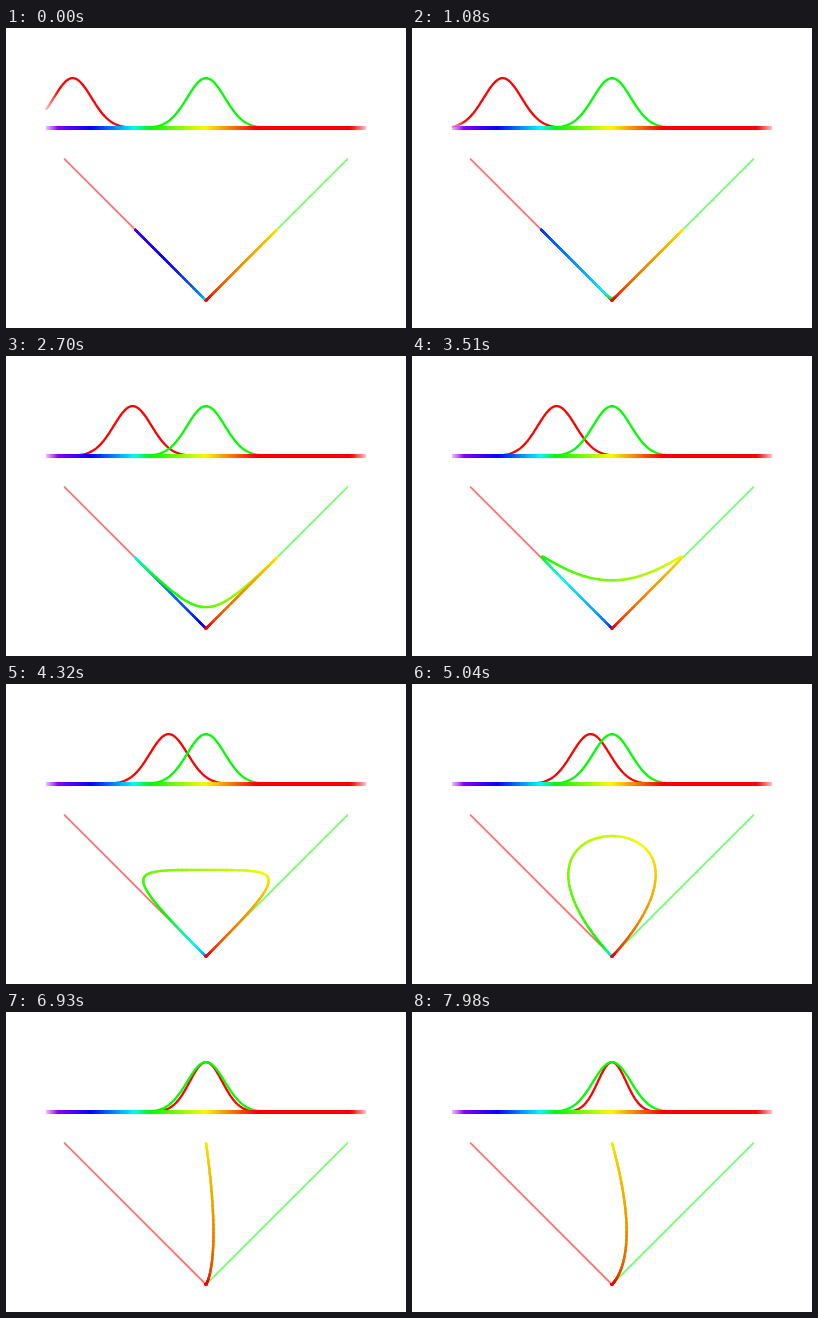
Write an HTML page with a canvas that moves like this. It is 400 px wide and 300 px high and loops after 8 s.

```html
<!DOCTYPE html>
<html lang="en">
<head>
<meta charset="utf-8">
<title>Spectral response curves</title>
<style>
  html, body { margin: 0; width: 100%; height: 100%; overflow: hidden; background: #fff; }
  canvas { display: block; width: 100%; height: 100%; }
</style>
</head>
<body>
<canvas></canvas>
<script>
const LOOP = 8000, STEP = 30;
const LEFT = 40, RIGHT = 360, MID = 200, BASE = 100, HEIGHT = 49.9;
const UNIT = (RIGHT - LEFT) / 12;   // pixels per unit of the horizontal axis
const ORIGIN = { x: 200, y: 272.5 }, SCALE = 70.7;

// Stage x and hue; the hue runs straight between them
const HUES = [[40, 285], [85, 240], [128, 180], [144, 120], [203, 55], [250, 0]];

const canvas = document.querySelector('canvas');
const ctx = canvas.getContext('2d');
const ratio = window.devicePixelRatio || 1;
canvas.width = 400 * ratio;
canvas.height = 300 * ratio;
ctx.scale(ratio, ratio);
ctx.lineJoin = 'round';

const clamp = v => Math.min(1, Math.max(0, v));
const edgeFade = x => clamp(0.25 + Math.min((x - LEFT) / 16, (RIGHT - x) / 20));

function hueAt(x) {
  let i = 1;
  while (i < HUES.length - 1 && HUES[i][0] < x) i++;
  const [x1, h1] = HUES[i - 1], [x2, h2] = HUES[i];
  return h1 + (h2 - h1) * clamp((x - x1) / (x2 - x1));
}

const spectrumAt = (x, alpha = 1) => `hsla(${hueAt(x)}, 100%, 49%, ${alpha})`;

function fadedInk(colorAt) {
  const gradient = ctx.createLinearGradient(LEFT, 0, RIGHT, 0);
  for (let x = LEFT; x <= RIGHT; x += 4) {
    gradient.addColorStop((x - LEFT) / (RIGHT - LEFT), colorAt(x, edgeFade(x)));
  }
  return gradient;
}

const rainbow = fadedInk(spectrumAt);
const redInk = fadedInk((x, alpha) => `rgba(255, 0, 0, ${alpha})`);
const greenInk = fadedInk((x, alpha) => `rgba(0, 255, 0, ${alpha})`);

const bell = (center, sharpness) => x => Math.exp(-(((x - center) / UNIT * sharpness) ** 2));

function stroke(points, ink, width, cap = 'round') {
  ctx.strokeStyle = ink;
  ctx.lineWidth = width;
  ctx.lineCap = cap;
  ctx.beginPath();
  for (const [x, y] of points) ctx.lineTo(x, y);
  ctx.stroke();
}

function drawBell(response, ink) {
  const points = [];
  for (let x = LEFT + 0.5; x < RIGHT; x++) {
    if (response(x) > 0.004) points.push([x, BASE - HEIGHT * response(x)]);
  }
  stroke(points, ink, 2.3);
}

const plot = (r, g) => [ORIGIN.x + (g - r) * SCALE, ORIGIN.y - (g + r) * SCALE];

function drawLocus(red, green) {
  const pointAt = x => plot(red(x), green(x));
  for (let x = LEFT; x < RIGHT; x++) {
    stroke([pointAt(x), pointAt(x + 1)], spectrumAt(x), 2.4);
  }
}

function draw(time) {
  const step = Math.floor((time % LOOP) / STEP);
  const center = MID + UNIT * Math.min(0, -5 + step * 0.025);
  const sharpness = 1 + 0.005 * Math.max(0, step - 200);
  const red = bell(center, sharpness), green = bell(MID, 1);

  ctx.fillStyle = '#fff';
  ctx.fillRect(0, 0, 400, 300);

  drawBell(red, redInk);
  drawBell(green, greenInk);
  stroke([[LEFT, BASE], [RIGHT, BASE]], rainbow, 4, 'butt');

  stroke([plot(0, 0), plot(2, 0)], 'rgba(255, 0, 0, .55)', 1.8);
  stroke([plot(0, 0), plot(0, 2)], 'rgba(0, 255, 0, .55)', 1.8);
  drawLocus(red, green);
}

const start = performance.now();
function tick() {
  draw(performance.now() - start);
  requestAnimationFrame(tick);
}
tick();
</script>
</body>
</html>
```
